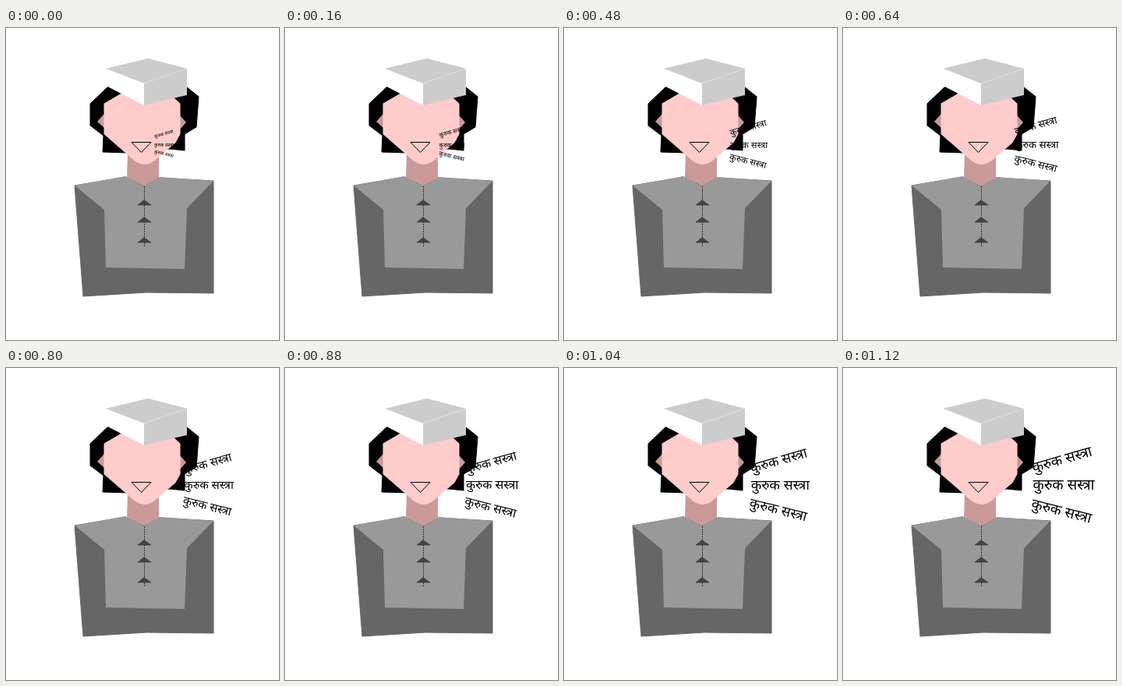
An HTML page that plays this animation: 350 by 400 pixels, repeating every 1.2 s.

```html
<!DOCTYPE html>
<html lang="hi">
<head>
<meta charset="utf-8">
<style>
html, body { margin: 0; width: 100%; height: 100%; overflow: hidden; background: #fff; }
svg { display: block; }
text { font: 18.7px "Noto Sans", "Noto Sans Devanagari", sans-serif; text-anchor: middle; }
</style>
</head>
<body>
<svg width="350" height="400" viewBox="0 0 350 400">
  <!-- hair, ears, neck, face -->
  <path stroke="#000" d="M130 76L108 97V125L125 138L124 159L156 160L210 155L229 157V136L244 127L247 88L232 76Z"/>
  <path fill="#c99" d="M126 110L117 120L126 128ZM223 112L231 121L223 130ZM156 160H196V192L177 203L155 192Z"/>
  <path fill="#fcc" stroke="#fcc" d="M126 97L150 83H208L223 97V136L217 147L190 170Q178 179 165 170L126 136Z"/>
  <path fill="none" stroke="#000" d="M161 146.5H186L173.5 159.5Z"/>
  <!-- hat -->
  <path fill="#fff" d="M128 52L177 71V99L132 76Z"/>
  <path fill="#ccc" d="M128 52L182 39L232 52V86L177 99V71Z"/>
  <path fill="none" stroke="#e6e6e6" stroke-width=".7" d="M177 71L232 52"/>
  <!-- coat -->
  <path fill="#666" stroke="#666" d="M88 202L153 191L177 203L197 192L266 196V340L180 339L99 344Z"/>
  <path fill="#999" d="M88 202L153 190L177 203L197 191L266 196L232 231L229 309L128 307L126 233Z"/>
  <path stroke="#333" stroke-dasharray="2 1" d="M177.5 203V281"/>
  <path fill="#444" stroke="#333" stroke-width=".6" d="M169 227L177 220.5L186 227ZM169 249L177 242.5L186 249ZM169 275L177 268.5L186 275Z"/>
  <g id="words"></g>
</svg>
<script>
const STEP = 80, STEPS = 15, START_X = 202.5;
const lines = [
  { endX: 281, from: 136, to: 118, tilt: -16 },
  { endX: 283, from: 150.5, to: 150.5, tilt: 0 },
  { endX: 280, from: 161.5, to: 184, tilt: 14 }
];
const words = document.getElementById("words");
words.innerHTML = lines.map(() => '<text y="5.5">कुरुक सस्त्रा</text>').join("");

const mix = (a, b, k) => a + (b - a) * k;

function draw(now) {
  const k = Math.floor(now / STEP) % STEPS / (STEPS - 1);
  lines.forEach(({ endX, from, to, tilt }, i) => {
    words.children[i].setAttribute("transform",
      `translate(${mix(START_X, endX, k)} ${mix(from, to, k)}) rotate(${tilt}) scale(${mix(0.32, 1, k)})`);
  });
}

const start = performance.now();
function loop() {
  draw(performance.now() - start);
  requestAnimationFrame(loop);
}
loop();
</script>
</body>
</html>
```
